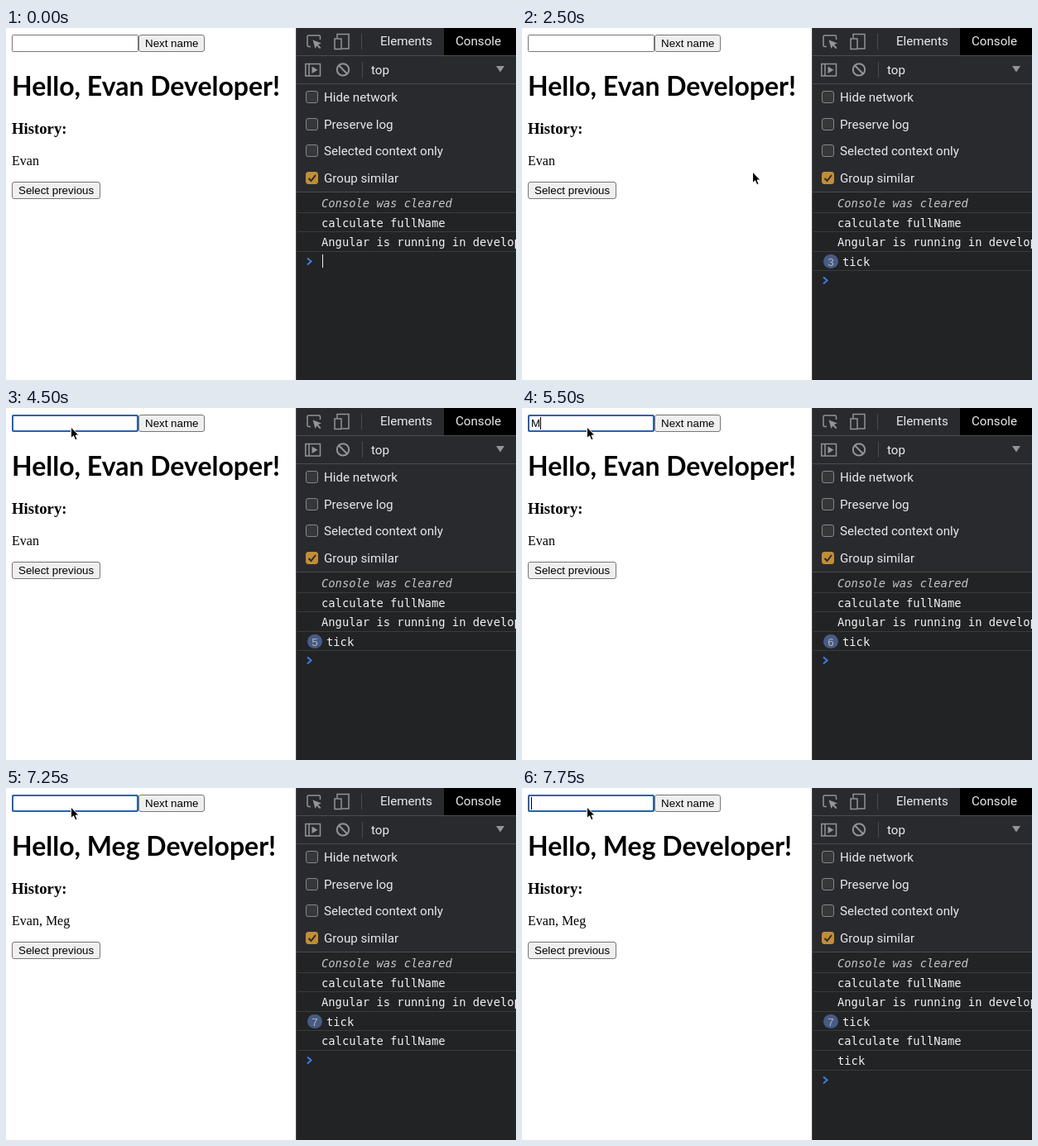
Write an HTML page that moves like this. It is 616x426 px and loops after 8 s.

```html
<!DOCTYPE html>
<html lang="en">
<head>
<meta charset="utf-8">
<title>Console demo</title>
<style>
  html, body { margin: 0; width: 100%; height: 100%; overflow: hidden; background: #fff; }
  svg { display: block; }
  text { white-space: pre; }
  .h1 { font: bold 32px Lato, sans-serif; }
  .h3 { font: bold 18.72px "Liberation Serif", serif; }
  .p { font: 16px "Liberation Serif", serif; }
  .ctl { font: 13.333px "Liberation Sans", sans-serif; }
  .ui { font: 15.15px Roboto, sans-serif; fill: #e8eaed; }
  .log { font: 13.8px "DejaVu Sans Mono", monospace; fill: #f2f2f2; }
  .note { font-style: italic; fill: #c6c6c6; }
  .badge { font: 13.5px "Liberation Sans", sans-serif; fill: #b9b2aa; text-anchor: middle; }
  .icon { fill: none; stroke: #919498; stroke-width: 1.5; }
  .btn { fill: #efefef; stroke: #767676; }
  .rule { stroke: #3b3b39; }
  .edge { stroke: #4a4c50; }
</style>
</head>
<body>
<svg width="616" height="426" viewBox="0 0 616 426">
  <!-- page -->
  <rect width="616" height="426" fill="#fff"/>
  <rect id="field" x="7.5" y="8.5" width="152" height="20" rx="1" fill="#fff" stroke="#767676"/>
  <rect id="ring" x="8" y="9" width="151" height="19" rx="2" fill="#fff" stroke="#2361bd" stroke-width="2"/>
  <text id="typed" class="ctl" x="11" y="23"/>
  <rect id="caret" y="11" width="1" height="15"/>
  <rect class="btn" x="160.5" y="8.5" width="79" height="20" rx="2.5"/>
  <text class="ctl" x="168" y="23">Next name</text>
  <text id="title" class="h1" x="7" y="82"/>
  <text class="h3" x="7" y="128">History:</text>
  <text id="history" class="p" x="7" y="166"/>
  <rect class="btn" x="7.5" y="186.5" width="106" height="20" rx="2.5"/>
  <text class="ctl" x="15" y="201">Select previous</text>

  <!-- developer tools -->
  <rect x="350" width="266" height="426" fill="#222325"/>
  <rect x="350" width="266" height="198" fill="#292a2d"/>
  <rect x="529" width="87" height="33" fill="#000"/>
  <path class="edge" d="M350.5 0V426M351 33.5H616M351 67.5H616M351 198.5H616M429.5 7V26M430.5 41V60"/>
  <text class="ui" x="452" y="21">Elements</text>
  <text class="ui" x="543" y="21">Console</text>
  <text class="ui" x="441" y="56">top</text>
  <path d="M592 46H602L597 53.5Z" fill="#919498"/>
  <g class="icon">
    <path d="M368 22.5H365.5Q364 22.5 364 21V10.5Q364 9 365.5 9H378Q379.5 9 379.5 10.5V14"/>
    <path d="M370.5 14.5L381 18.5L377 20L380.5 24L379 25.3L375.5 21.5L373.5 25Z" fill="#919498" stroke="none"/>
    <path d="M400 12V7.5H414V25H406"/>
    <rect x="397" y="13" width="8" height="12.5"/>
    <path d="M361.8 43.5H379.5V58H361.8ZM366 43.5V58"/>
    <path d="M369.5 46.5L376.5 50.8L369.5 55Z" fill="#919498" stroke="none"/>
    <path d="M401.7 45L412.3 55.8" stroke-width="2"/>
    <circle cx="407" cy="50.4" r="7.2" stroke-width="2"/>
  </g>
  <g id="options"></g>
  <g id="console"></g>
  <path id="prompt" d="M364 -4L368.6 0L364 4" fill="none" stroke="#3f7de0" stroke-width="2"/>
  <rect id="cursor" x="382" width="1" height="16" fill="#eee"/>

  <path id="mouse" d="M2.5 2V15.6L5.6 12.8L7.7 17.7L10 16.7L8 12H12Z" fill="#000" stroke="#fff" stroke-width="1"/>
</svg>
<script>
const LOOP = 8000, PITCH = 23.6;
const $ = id => document.getElementById(id);

const FIRST = "Evan", SECOND = "Meg";
const start = {
  name: FIRST, history: FIRST, typed: "", focus: false, caret: null,
  ticks: 0, extra: [], cursor: true, mouse: null
};
const calc = "calculate fullName";

// Each step changes part of the state from its time on.
const steps = [
  [250, { cursor: false }],
  [500, { ticks: 1 }],
  [750, { cursor: true }],
  [1500, { ticks: 2, cursor: false }],
  [2000, { cursor: true }],
  [2500, { ticks: 3, cursor: false, mouse: [276, 172] }],
  [2750, { mouse: [225, 119] }],
  [3000, { mouse: [220, 117], cursor: true }],
  [3250, { mouse: [96, 56] }],
  [3500, { mouse: [81.5, 31], ticks: 4, cursor: false }],
  [3750, { mouse: [76, 21], focus: true, caret: 11 }],
  [4500, { ticks: 5, caret: null }],
  [5000, { caret: 11 }],
  [5500, { ticks: 6, typed: SECOND.slice(0, 1), caret: 22 }],
  [5750, { typed: SECOND.slice(0, 2), caret: 30 }],
  [6000, { typed: SECOND, caret: 37 }],
  [6500, { ticks: 7, caret: null }],
  [6750, { name: SECOND, history: FIRST + ", " + SECOND, typed: "", caret: 11, extra: [calc] }],
  [7250, { caret: null }],
  [7500, { extra: [calc, "tick"] }],
  [7750, { caret: 11 }]
];

const show = (id, on) => $(id).setAttribute("visibility", on ? "visible" : "hidden");

$("options").innerHTML = ["Hide network", "Preserve log", "Selected context only", "Group similar"]
  .map((label, i) => {
    const y = Math.round(76.2 + i * 32.6), on = i === 3;
    return `<rect x="362.5" y="${y + .5}" width="14" height="14" rx="2.5"
        fill="${on ? "#c18d38" : "#363739"}" stroke="${on ? "#c18d38" : "#858789"}"/>` +
      (on ? `<path d="M365.5 ${y + 8}L368.5 ${y + 11}L374 ${y + 4}" fill="none" stroke="#292a2d" stroke-width="2"/>` : "") +
      `<text class="ui" x="384" y="${y + 13}">${label}</text>`;
  }).join("");

function logRow(text, i, count) {
  const y = Math.round(217 + i * PITCH), line = Math.floor(223 + i * PITCH) + .5;
  const badge = count > 1
    ? `<rect x="364" y="${y - 14}" width="18" height="17" rx="8.5" fill="#465b86"/>
       <text class="badge" x="373" y="${y - .5}">${count}</text>` : "";
  return `${badge}<text class="log${i ? "" : " note"}" x="${badge ? 387 : 381}" y="${y}">${text}</text>
    <path class="rule" d="M352 ${line}H616"/>`;
}

function draw(s) {
  $("title").textContent = `Hello, ${s.name} Developer!`;
  $("history").textContent = s.history;
  $("typed").textContent = s.typed;
  show("ring", s.focus);
  show("caret", s.caret !== null);
  $("caret").setAttribute("x", s.caret || 0);

  const rows = ["Console was cleared", calc, "Angular is running in development mode."];
  if (s.ticks) rows.push("tick");
  rows.push(...s.extra);
  $("console").innerHTML = rows.map((text, i) => logRow(text, i, i === 3 ? s.ticks : 0)).join("");

  const y = Math.round(212 + rows.length * PITCH) - .5;
  $("prompt").setAttribute("transform", `translate(0 ${y})`);
  $("cursor").setAttribute("y", y - 8.5);
  show("cursor", s.cursor);
  show("mouse", s.mouse);
  if (s.mouse) $("mouse").setAttribute("transform", `translate(${s.mouse})`);
}

let shown = -1;
const origin = performance.now();
function tick() {
  const t = Math.max(0, performance.now() - origin) % LOOP;
  const past = steps.filter(([at]) => at <= t);
  if (past.length !== shown) {
    shown = past.length;
    draw(Object.assign({}, start, ...past.map(([, change]) => change)));
  }
  requestAnimationFrame(tick);
}
tick();
</script>
</body>
</html>
```
